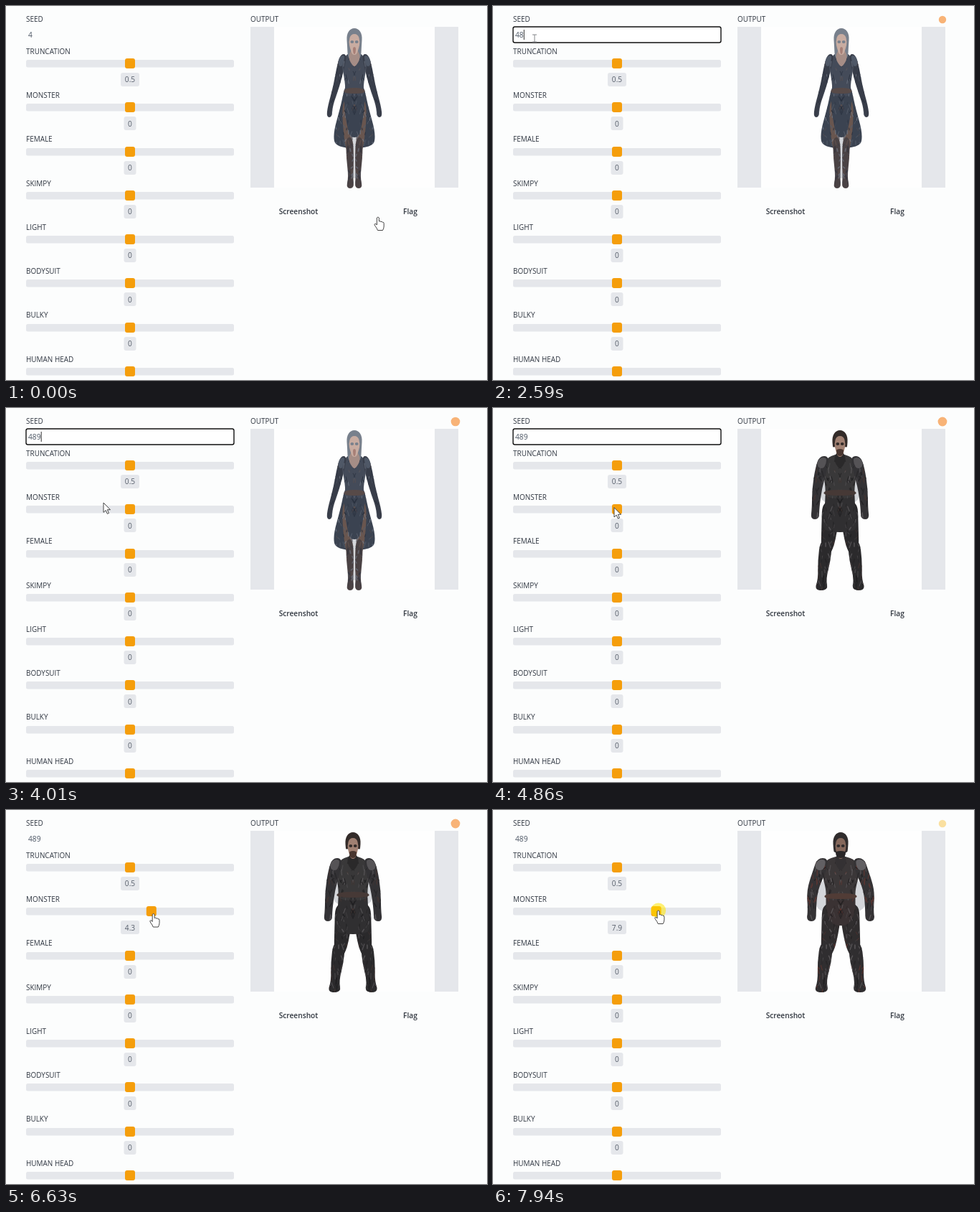
Recreate the animation shown at these times as an HTML page. Size 671 by 521 pixels, loop 8000 ms.

```html
<!DOCTYPE html>
<html lang="en">
<head>
<meta charset="utf-8">
<title>Character generator</title>
<style>
  html, body { margin: 0; width: 100%; height: 100%; overflow: hidden; background: #fcfdfd; }
  svg { display: block; font: 10.2px "Open Sans", "Noto Sans", sans-serif; }
  .label { font-size: 9.95px; fill: #303742; }
  .value { fill: #565e6a; text-anchor: middle; }
  .button { font-weight: 600; fill: #30363f; text-anchor: middle; }
</style>
</head>
<body>
<svg id="stage" width="671" height="521" viewBox="0 0 671 521"></svg>
<script>
const LOOP = 8000;
const FOCUS = 1820, TYPE_8 = 2590, TYPE_9 = 2900, GRAB = 5170, RELEASE = 6200, REGRAB = 7690;
const stage = document.getElementById('stage');

function add(tag, attrs = {}, parent = stage, text = '') {
  const node = document.createElementNS('http://www.w3.org/2000/svg', tag);
  for (const name in attrs) node.setAttribute(name, attrs[name]);
  node.textContent = text;
  parent.append(node);
  return node;
}
const label = (text, x, y) => add('text', { x, y, class: 'label' }, stage, text);
const show = (node, on) => node.setAttribute('visibility', on ? 'visible' : 'hidden');
const move = (node, x, y) => node.setAttribute('transform', `translate(${x.toFixed(1)} ${y.toFixed(1)})`);
const ramp = (t, from, to) => Math.min(1, Math.max(0, (t - from) / (to - from)));
const mix = (a, b, k) => a + (b - a) * k;

function seeded(seed) {
  return () => (seed = (seed * 16807) % 2147483647) / 2147483647;
}

// Seed field
label('SEED', 28, 22);
const focusRing = add('rect', { x: 28, y: 29, width: 290, height: 22, rx: 2.5, fill: '#fff', stroke: '#111', 'stroke-width': 1.4 });
const seedText = add('text', { x: 31, y: 44, fill: '#4b5563' });
const caret = add('rect', { y: 33, width: 1, height: 14, fill: '#333' });

// Sliders
function slider(name, i) {
  const y = 63.2 + 61.25 * i;
  const middle = Math.round(y + 17);
  label(name, 28, y + 3.7);
  add('rect', { x: 28, y: middle - 5, width: 290, height: 10.5, rx: 2.5, fill: '#e5e7eb' });
  const thumb = add('rect', { x: -7, y: -7, width: 14, height: 14, rx: 3, fill: '#f59e0b' });
  const pill = add('rect', { y: Math.round(y + 30), height: 19, rx: 3, fill: '#e5e7eb' });
  const value = add('text', { x: 173, y: y + 43.2, class: 'value' });
  return (text, thumbX) => {
    const width = text.length > 1 ? 26 : 17;
    pill.setAttribute('x', 173 - width / 2);
    pill.setAttribute('width', width);
    value.textContent = text;
    move(thumb, thumbX, middle);
  };
}
const sliders = ['TRUNCATION', 'MONSTER', 'FEMALE', 'SKIMPY', 'LIGHT', 'BODYSUIT', 'BULKY', 'HUMAN HEAD'].map(slider);
sliders.forEach((set, i) => set(i ? '0' : '0.5', 173));

// Output panel
label('OUTPUT', 341, 22);
add('rect', { x: 341, y: 29, width: 290, height: 224, fill: '#e5e7eb' });
add('rect', { x: 374, y: 29, width: 224, height: 224, fill: '#fefefe' });
add('text', { x: 408, y: 290, class: 'button' }, stage, 'Screenshot');
add('text', { x: 564, y: 290, class: 'button' }, stage, 'Flag');
const loader = add('circle', { cx: 627, cy: 19 });

// Closed outline around a column of rows [y, half width, offset from the axis]
function column(axis, rows) {
  const edge = side => rows.map(([y, half, offset = 0]) => [axis + offset + side * half, y]);
  const points = [...edge(-1), ...edge(1).reverse()];
  const middle = i => {
    const a = points[i], b = points[(i + 1) % points.length];
    return `${(a[0] + b[0]) / 2} ${(a[1] + b[1]) / 2}`;
  };
  return `M${middle(points.length - 1)}` + points.map((p, i) => `Q${p.join(' ')} ${middle(i)}`).join('') + 'Z';
}

// A figure built from its proportions; cloth gets a mirrored, seeded texture
function character(id, c) {
  const group = add('g');
  const clip = add('clipPath', { id }, group);
  const shape = (fill, ...rows) => add('path', { fill, d: column(c.axis, rows) }, group);
  const cloth = (fill, ...rows) => add('path', { d: shape(fill, ...rows).getAttribute('d') }, clip);
  const both = (part, fill, ...rows) => [-1, 1].forEach(side =>
    part(fill, ...rows.map(([y, half, offset]) => [y, half, side * offset])));
  const thigh = c.hip * .6, knee = (thigh + c.foot) / 2;

  if (c.tail) cloth(c.coat, [105, c.waist], [140, c.hip + 4], [178, c.tail], [198, c.tail - 4]);
  shape('#d4d6da', ...c.gap);
  both(cloth, c.thigh, [130, c.leg, thigh], [160, c.leg, thigh + 1], [205, c.leg * .65, knee]);
  both(cloth, c.boot, [183, c.leg * .7, knee], [212, c.leg * .75, mix(knee, c.foot, .5)],
    [238, c.leg * .45, c.foot], [254, c.leg * .8, c.foot + 1]);
  cloth(c.coat, [106, c.waist], [140, c.hip], [c.hem, c.panel], [c.hem + 5, c.panel / 2]);
  cloth(c.top, [64, 5], [70, c.shoulder * .8], [86, c.shoulder], [112, c.waist], [126, c.hip]);
  both(cloth, c.sleeve, [67, c.arm * .8, c.shoulder - 2], [84, c.arm, c.shoulder + 2],
    [112, c.arm * .8, c.elbow], [140, c.arm * .6, c.wrist], [155, c.arm * .7, c.wrist + 1]);

  const random = seeded(41);
  const texture = add('g', { 'clip-path': `url(#${id})`, 'stroke-linecap': 'round', opacity: .65 }, group);
  for (let i = 0; i < 230; i++) {
    const x = random() * 46, y = 64 + random() * 188, dx = (random() - .5) * 6, dy = 2 + random() * 6;
    const stroke = c.tones[Math.floor(random() * c.tones.length)], width = .6 + random() * 1.3;
    for (const side of [-1, 1])
      add('path', { d: `M${c.axis + side * x} ${y}l${side * dx} ${dy}`, stroke, 'stroke-width': width }, texture);
  }

  both(shape, c.pad, [69, c.arm * .5, c.shoulder - 1], [77, c.arm * .8, c.shoulder + 2], [84, c.arm * .4, c.shoulder + 2]);
  shape(c.belt, [c.waistline, c.waist + 1], [c.waistline + 8, c.waist + 4]);
  shape(c.hair, [31, 5], [40, 11], [55, 10], [c.hairEnd, 9]);
  shape(c.neck, [60, 4], [72, 9], [84, 2]);
  shape(c.skin, [39, 5], [50, 8], [59, 6], [68, 3]);
  both(shape, c.hair, [48, 2.4, 3.2], [52, 2.4, 3.2]);
  shape(c.mouth, [57, c.beard], [62, c.beard], [67, c.beard * .6]);
  return group;
}

const ranger = character('ranger', {
  axis: 486, shoulder: 17, waist: 12, hip: 15, elbow: 25, wrist: 34, foot: 5, arm: 5.5, leg: 7,
  tail: 30, hem: 178, panel: 8, waistline: 114, hairEnd: 76, beard: 2, gap: [[150, 12], [195, 7], [240, 6]],
  coat: '#3b4351', top: '#444b59', sleeve: '#383d49', thigh: '#69564f', boot: '#4a4244', pad: '#4f5867',
  belt: '#574a48', hair: '#78808c', skin: '#c8aca1', neck: '#a58d86', mouth: '#a77f76',
  tones: ['#222936', '#717987', '#2d3442', '#555d6b', '#63534f']
});
const soldier = character('soldier', {
  axis: 484, shoulder: 24, waist: 20, hip: 21, elbow: 32, wrist: 34, foot: 25, arm: 8.5, leg: 12,
  tail: 0, hem: 168, panel: 25, waistline: 114, hairEnd: 54, beard: 5, gap: [[92, 24], [112, 28], [134, 26]],
  coat: '#302f31', top: '#393839', sleeve: '#333235', thigh: '#2a292b', boot: '#2b2a2c', pad: '#555356',
  belt: '#463936', hair: '#332b29', skin: '#a08072', neck: '#2a292a', mouth: '#493630',
  tones: ['#171719', '#535154', '#222123', '#656265', '#4a3733']
});
const brute = character('brute', {
  axis: 485, shoulder: 27, waist: 20, hip: 21, elbow: 40, wrist: 40, foot: 26, arm: 9.5, leg: 13,
  tail: 0, hem: 156, panel: 14, waistline: 116, hairEnd: 60, beard: 7, gap: [[94, 26], [118, 34], [144, 34]],
  coat: '#3a3233', top: '#3b3738', sleeve: '#353335', thigh: '#302d2e', boot: '#302e30', pad: '#626063',
  belt: '#513c36', hair: '#302c2d', skin: '#85685c', neck: '#343133', mouth: '#292628',
  tones: ['#181719', '#5c585b', '#252224', '#6c686a', '#6b3831']
});

// Pointers, each with its hot spot at 0,0
const press = add('circle', { r: 10.5, fill: '#ffe600', opacity: .55 });
const pointer = { fill: '#fff', stroke: '#333', 'stroke-width': .9, 'stroke-linejoin': 'round' };
const arrow = add('path', { ...pointer, d: 'M0 0V13.4L3.2 10.5 5.4 15.4 7.5 14.5 5.4 9.7H9.5Z' });
const hand = add('path', { ...pointer, d: 'M-1.6 11V1Q0-1 1.4 1V6Q3.2 5 4 6.6 5.6 5.6 6.3 7.3 8.2 6.8 8.2 8.8V13Q8 16 6.5 18.5H-.5Q-1.5 15.5-4 12.5-6 9.6-4 9.2-2.7 9.3-1.6 11Z' });
const beam = add('path', { d: 'M-3-5H3M0-5V5M-3 5H3', fill: 'none', stroke: '#85878b' });

const STOPS = [
  { t: 0, x: 519, y: 294 }, { t: 560, x: 200, y: 61 }, { t: 860, x: 116, y: 104 }, { t: 1060, x: 58, y: 45 },
  { t: 2590, x: 58, y: 45 }, { t: 4010, x: 136, y: 132 }, { t: GRAB, x: 176, y: 140 }
];

const monsterAt = t => 3.2 * ramp(t, GRAB, 5390) + 1.1 * ramp(t, 5390, 6000) + 3.6 * ramp(t, REGRAB, 7940);
const thumbAt = monster => 173 + 6.92 * monster;

function pointerAt(t) {
  if (t >= GRAB)
    return [thumbAt(monsterAt(t)) + 3, 140 + 4.5 * (ramp(t, RELEASE, 6500) - ramp(t, 7500, REGRAB))];
  const i = STOPS.findIndex(stop => stop.t > t), a = STOPS[i - 1], b = STOPS[i];
  const k = ramp(t, a.t, b.t), eased = k * k * (3 - 2 * k);
  return [mix(a.x, b.x, eased), mix(a.y, b.y, eased)];
}

function draw(t) {
  const focused = t >= FOCUS && t < GRAB;
  const text = t < TYPE_8 ? '4' : t < TYPE_9 ? '48' : '489';
  const lastInput = t < TYPE_8 ? FOCUS : t < TYPE_9 ? TYPE_8 : TYPE_9;
  seedText.textContent = text;
  show(focusRing, focused);
  show(caret, focused && (t - lastInput) % 1000 < 450);
  caret.setAttribute('x', 31 + 5.9 * text.length);

  const monster = monsterAt(t);
  sliders[1](monster ? monster.toFixed(1) : '0', thumbAt(monster));

  show(ranger, t < 4150);
  show(soldier, t >= 4150 && t < 7100);
  show(brute, t >= 7100);

  const waking = t >= REGRAB;
  show(loader, waking || (t >= TYPE_8 && t < 7470));
  loader.setAttribute('r', 5.8 - .6 * Math.cos((t - TYPE_8) / 900 * 2 * Math.PI));
  loader.setAttribute('fill', waking ? '#fae0a0' : '#f8b377');

  const [x, y] = pointerAt(t);
  const overField = t >= 1020 && t < 2740;
  const overControl = t < 70 || t >= 4900;
  show(beam, overField);
  show(hand, overControl);
  show(arrow, !overField && !overControl);
  show(press, (t >= GRAB && t < RELEASE) || waking);
  for (const node of [beam, hand, arrow, press]) move(node, x, y);
}

function frame(now) {
  draw(now % LOOP);
  requestAnimationFrame(frame);
}
draw(0);
requestAnimationFrame(frame);
</script>
</body>
</html>
```
